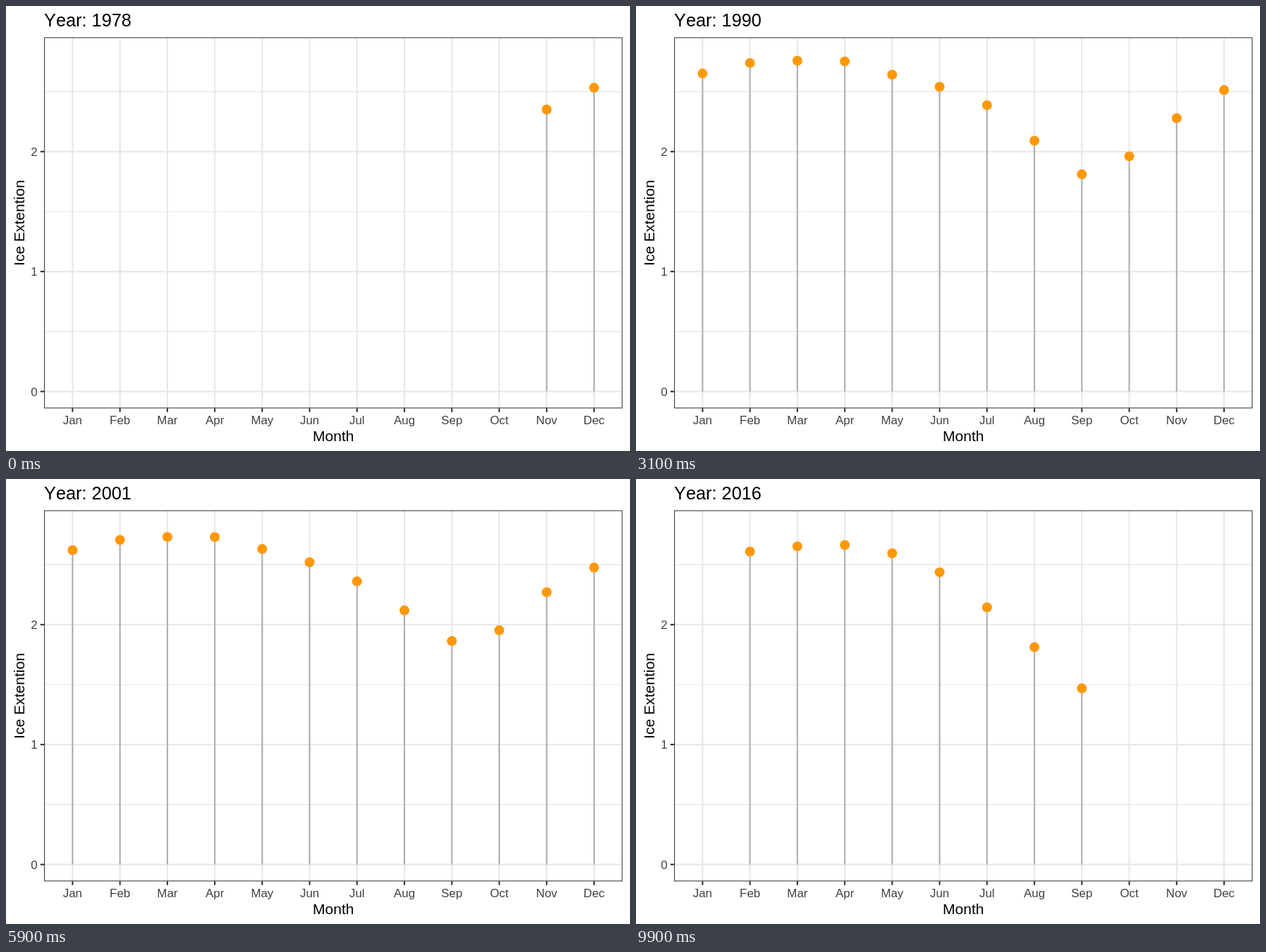
Animation of 885x632 px, one loop 10000 ms. Source, as an HTML page:

```html
<!DOCTYPE html>
<html lang="en">
<head>
<meta charset="utf-8">
<title>Ice extent by month</title>
<style>
  html, body { margin: 0; width: 100%; height: 100%; overflow: hidden; background: #fff; }
  svg { display: block; font: 21.1px "Liberation Sans", Arial, sans-serif; font-kerning: none; }
  .tick { font-size: 16.9px; fill: #404040; }
</style>
</head>
<body>
<svg id="plot" width="885" height="632" viewBox="0 0 885 632"></svg>
<script>
const plot = document.getElementById('plot');
const STEPS = 100, STEP_MS = 100, FIRST_YEAR = 1978, SPAN = 38;
const ZERO = 547.5, UNIT = 170.35;
const LEFT = 54.1, RIGHT = 874.4, TOP = 44.5, BOTTOM = 571.4;
const MONTHS = 'Jan Feb Mar Apr May Jun Jul Aug Sep Oct Nov Dec'.split(' ');
const xOf = month => 94.4 + month * 67.24;
const yOf = value => ZERO - value * UNIT;

function add(tag, attrs, text = '') {
  const el = document.createElementNS('http://www.w3.org/2000/svg', tag);
  for (const key in attrs) el.setAttribute(key, attrs[key]);
  el.textContent = text;
  return plot.appendChild(el);
}
const line = (x1, y1, x2, y2, stroke, width = 2) =>
  add('line', { x1, y1, x2, y2, stroke, 'stroke-width': width });

// Seasonal curve (point heights by month) in an early and a late year
const EARLY = [95, 80, 77, 78, 97, 113, 133, 172, 212, 193, 152, 117];
const LATE = [110, 96, 90, 89, 103, 127, 170, 226, 282, 265, 180, 140];
const EARLY_STEP = 14, LATE_STEP = 85;

// September's departure from the trend: turning points as [step, pixels]
const SWINGS = [[0, -20], [14, 0], [18, 10], [26, -7], [31, 23], [36, -14], [44, 10], [47, -25],
  [59, -10], [63, 2], [73, -16], [76, 28], [81, -14], [85, 0], [89, 41], [92, -30], [99, -15]];

function swing(step) {
  const i = Math.max(1, SWINGS.findIndex(p => p[0] >= step));
  const [a, from] = SWINGS[i - 1], [b, to] = SWINGS[i];
  return from + (to - from) * (step - a) / (b - a);
}

// The ice loss accelerates; the yearly swing fades out away from September
function height(month, step) {
  const loss = Math.max(0, (step - EARLY_STEP) / (LATE_STEP - EARLY_STEP)) ** 2;
  const nearness = Math.exp(-(((month - 8) / 1.7) ** 2));
  return EARLY[month] + (LATE[month] - EARLY[month]) * loss + swing(step) * nearness;
}

// Records start in November of the first year and end in September of the last
const stepOfYear = year => Math.round((year - FIRST_YEAR) * (STEPS - 1) / SPAN);
function visible(month, step) {
  if (step < stepOfYear(FIRST_YEAR + 1)) return month > 9;
  if (step > stepOfYear(FIRST_YEAR + SPAN - 1)) return month > 0 && month < 9;
  return true;
}

// Grid, axes and labels
for (const v of [0.5, 1.5, 2.5]) line(LEFT, yOf(v), RIGHT, yOf(v), '#e6e6e6', 1.1);
for (const v of [0, 1, 2]) {
  line(LEFT, yOf(v), RIGHT, yOf(v), '#e6e6e6');
  line(48.8, yOf(v), LEFT, yOf(v), '#282828');
  add('text', { x: 44.6, y: yOf(v) + 6.2, class: 'tick', 'text-anchor': 'end' }, v);
}
MONTHS.forEach((name, m) => {
  line(xOf(m), TOP, xOf(m), BOTTOM, '#e6e6e6');
  line(xOf(m), BOTTOM, xOf(m), 576.7, '#282828');
  add('text', { x: xOf(m), y: 594, class: 'tick', 'text-anchor': 'middle' }, name);
});
add('text', { x: 464.2, y: 618, 'text-anchor': 'middle' }, 'Month');
add('text', { transform: 'translate(25.6 308) rotate(-90)', 'text-anchor': 'middle' }, 'Ice Extention');
const title = add('text', { x: 54.1, y: 29, 'font-size': 25.3 });

const stems = MONTHS.map((_, m) => line(xOf(m), ZERO, xOf(m), ZERO, '#adadad'));
const dots = MONTHS.map((_, m) => add('circle', { cx: xOf(m), r: 7, fill: '#ff9808' }));

// Only the inner half of the panel border shows
add('rect', { x: LEFT + 0.5, y: TOP + 0.5, width: RIGHT - LEFT - 1, height: BOTTOM - TOP - 1,
  fill: 'none', stroke: '#282828' });

function draw(step) {
  title.textContent = 'Year: ' + Math.round(FIRST_YEAR + SPAN * step / (STEPS - 1));
  MONTHS.forEach((_, m) => {
    const y = height(m, step), show = visible(m, step) ? 'visible' : 'hidden';
    stems[m].setAttribute('y2', y);
    dots[m].setAttribute('cy', y);
    stems[m].setAttribute('visibility', show);
    dots[m].setAttribute('visibility', show);
  });
}

const start = performance.now();
function tick() {
  draw(Math.floor((performance.now() - start) / STEP_MS) % STEPS);
  requestAnimationFrame(tick);
}
tick();
</script>
</body>
</html>
```
